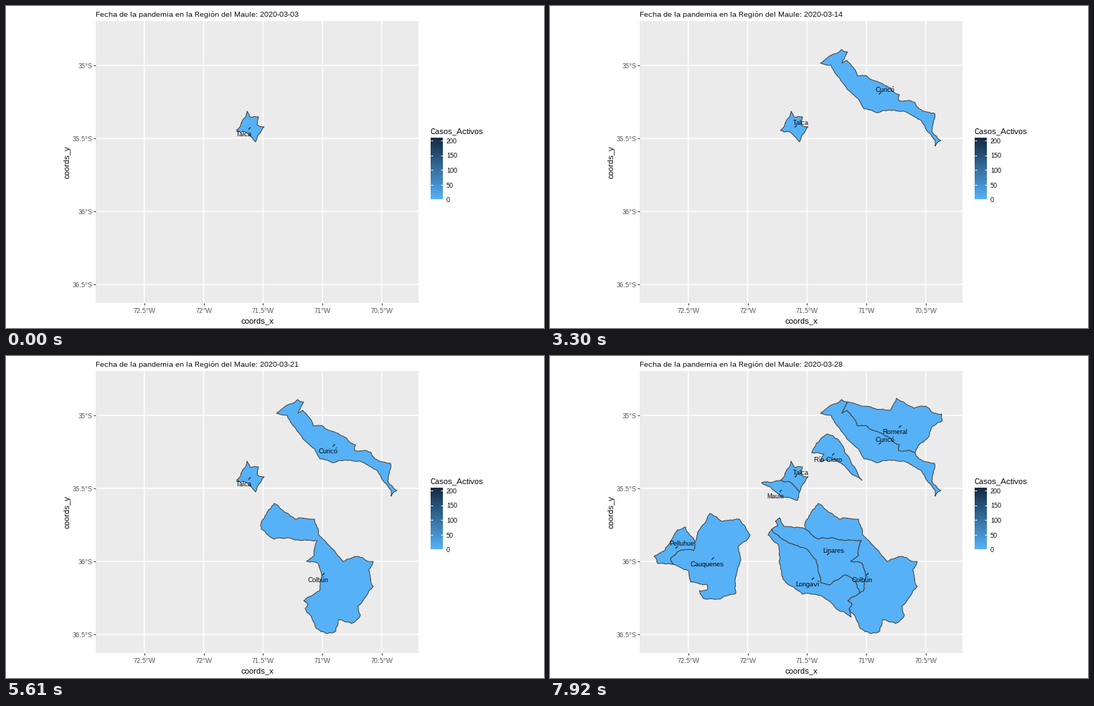
These frames come from a looping animation (750x450 px, 8 s). A matplotlib script:

```python
import numpy as np
import matplotlib.pyplot as plt
from matplotlib.animation import FuncAnimation
from matplotlib.patches import Polygon, Rectangle

W, H, DPI = 750, 450, 100
LOOP, TICK, STEP = 8000, 20, 330
LIGHT, DARK = "#56B1F7", "#132B43"

# Whole-pixel hinting gives the crisp, evenly spaced small type
plt.rcParams.update({"font.family": "Liberation Sans",
                     "text.hinting": "native", "text.hinting_factor": 1})
fig = plt.figure(figsize=(W / DPI, H / DPI), dpi=DPI, facecolor="white")
ax = fig.add_axes([0, 0, 1, 1])
ax.axis("off")


def pt(px):
    return px * 72 / DPI


def text(x, y, s, px, color="black", **kw):
    kw.setdefault("va", "baseline")
    return ax.text(x, y, s, fontsize=pt(px) + 0.01, color=color, **kw)


def line(x0, y0, x1, y1, color, px=1.0, **kw):
    return ax.plot([x0, x1], [y0, y1], color=color, lw=pt(px),
                   solid_capstyle="butt", **kw)[0]


def draw_axes():
    ax.add_patch(Rectangle((125, 21), 450, 394, fc="#EBEBEB", ec="none", zorder=0))
    for i in range(5):
        x = 192.9 + 82.75 * i
        line(x, 21, x, 415, "white", 1.5, zorder=1, snap=False)
        line(x, 415, x, 418, "#333333", zorder=1)
        text(x, 429, f"{72.5 - i / 2:g}°W", 9, "#4D4D4D", ha="center")
    for i in range(4):
        y = 83 + 102 * i
        line(125, y, 575, y, "white", 1.5, zorder=1, snap=False)
        line(122, y, 125, y, "#333333", zorder=1)
        text(120.5, y + 4, f"{35 + i / 2:g}°S", 9, "#4D4D4D", ha="right")
    text(350.5, 443, "coords_x", 11, ha="center")
    text(85.5, 218, "coords_y", 11, ha="center", va="center", rotation=90)


def draw_legend():
    text(592, 178, "Casos_Activos", 11)
    dark, light = (np.array(plt.matplotlib.colors.to_rgb(c)) for c in (DARK, LIGHT))
    mix = np.linspace(0, 1, 86)[:, None, None]
    ax.imshow(dark + (light - dark) * mix, extent=(592, 609, 270, 184),
              aspect="auto", interpolation="nearest", zorder=2)
    for i in range(5):
        y = 270.3 - 20.6 * i
        line(592, y, 595.4, y, "white", zorder=3)
        line(605.6, y, 609, y, "white", zorder=3)
        text(614, y + 4, str(50 * i), 9)


def roughen(points, rounds=3):
    """Jagged outline; the shift depends on place only, so borders coincide."""
    p = np.array(points, float)
    for _ in range(rounds):
        q = np.roll(p, -1, axis=0)
        mid = (p + q) / 2
        amp = np.minimum(0.1 * np.hypot(*(q - p).T), 1.2)
        phase = 7.3 * mid[:, 0] + 4.1 * mid[:, 1]
        mid += amp[:, None] * np.c_[np.sin(phase), np.cos(1.7 * phase)]
        p = np.stack([p, mid], axis=1).reshape(-1, 2)
    return p


# Corners of the borders that two communes share
talca_s = [(321, 174), (334, 176), (348, 190)]
curico_n = [(415, 64), (407, 80), (414, 76), (422, 85), (428, 97), (442, 98),
            (470, 112), (487, 124), (486, 132), (499, 132), (509, 135)]
linares_n = [(356, 242), (374, 256), (394, 254), (412, 258), (434, 258)]
linares_e = [(430, 278), (419, 287), (435, 290), (440, 308), (437, 328)]
linares_s = [(309, 242), (325, 257), (358, 270), (371, 285), (377, 317),
             (390, 320), (413, 306), (426, 314), (432, 331)]
longavi_e = [(432, 331), (415, 342), (421, 347), (417, 353)]
pelluhue_e = [(172, 291), (168, 283), (183, 271), (200, 272), (202, 260)]

talca = talca_s + [(354, 178), (360, 169), (350, 166), (352, 155), (340, 155),
                   (336, 147), (332, 157)]
maule = talca_s + [(345, 202), (322, 196), (311, 187), (295, 177)]
curico = curico_n + [
    (515, 144), (536, 150), (532, 175), (545, 188), (537, 196), (536, 187),
    (518, 161), (494, 147), (464, 146), (458, 149), (438, 144), (412, 112),
    (392, 83), (377, 80), (406, 61)]
romeral = curico_n[::-1] + [
    (447, 71), (474, 76), (483, 59), (507, 73), (524, 70), (535, 80),
    (546, 81), (547, 90), (532, 99), (526, 115), (513, 126)]
rio_claro = [(387, 109), (402, 117), (414, 138), (435, 174), (418, 162),
             (397, 144), (377, 148), (382, 137), (365, 135), (371, 122)]
colbun = linares_n + linares_e + longavi_e + [
    (424, 362), (432, 380), (448, 388), (460, 384), (464, 368), (482, 374),
    (494, 362), (490, 350), (512, 322), (506, 298), (512, 287), (491, 280),
    (470, 287), (436, 250), (430, 228), (403, 228), (374, 206), (364, 218),
    (355, 237)]
linares = linares_n + linares_e + linares_s[::-1] + [
    (318, 238), (314, 231), (320, 226), (326, 238)]
longavi = linares_s + longavi_e[1:] + [
    (420, 365), (403, 356), (378, 335), (352, 333), (327, 314), (320, 290),
    (317, 262), (304, 250)]
cauquenes = pelluhue_e + [
    (206, 246), (223, 220), (240, 231), (264, 228), (279, 250), (262, 267),
    (265, 288), (260, 306), (259, 332), (240, 338), (214, 339), (208, 328),
    (219, 327), (219, 319), (196, 316), (193, 300)]
pelluhue = pelluhue_e + [(189, 239), (178, 243), (160, 272), (145, 280), (150, 290)]


class Commune:
    """Outline with a label below left of its centre, or above right on some days."""

    def __init__(self, name, shape, centre, first, raised=()):
        self.centre, self.first, self.raised = centre, first, raised
        self.area = ax.add_patch(Polygon(
            roughen(shape), fc=LIGHT, ec="#404040", lw=pt(1), zorder=4))
        self.link = line(0, 0, 0, 0, "black", zorder=5)
        self.label = text(0, 0, name, 9, ha="center", zorder=6)

    def show(self, day):
        for artist in (self.area, self.link, self.label):
            artist.set_visible(day >= self.first)
        x, y = self.centre
        side = 1 if day in self.raised else -1
        self.label.set_position((x + 9 * side, y + 4.3 - 8 * side))
        self.link.set_data([x, x + 3 * side], [y, y - 3 * side])


draw_axes()
draw_legend()
ax.set_xlim(0, W)
ax.set_ylim(H, 0)
title = text(125, 15, "", 10)

north_days = {6, 8, 10, 13, 15, 16, 18, 21, 24}
communes = [
    Commune("Talca", talca, (341, 169.5), 0, north_days),
    Commune("Curicó", curico, (458.5, 123.5), 8, north_days),
    Commune("Colbún", colbun, (444, 303.5), 14, {20, 22, 23}),
    Commune("Linares", linares, (386.3, 278.3), 18, {20, 22, 23, 24}),
    Commune("Río Claro", rio_claro, (396.3, 136), 18, range(18, 24)),
    Commune("Longaví", longavi, (368, 309.7), 19, {20}),
    Commune("Maule", maule, (323, 187), 23),
    Commune("Romeral", romeral, (489.5, 97), 24),
    Commune("Cauquenes", cauquenes, (228.5, 281.5), 24),
    Commune("Pelluhue", pelluhue, (175, 269), 24, {24}),
]


def update(frame):
    day = min((frame * TICK + TICK // 2) // STEP, 24)
    date = 3 + day + (day >= 9)  # one date is missing from the data
    title.set_text(f"Fecha de la pandemia en la Región del Maule: 2020-03-{date:02d}")
    for c in communes:
        c.show(day)
    return []


anim = FuncAnimation(fig, update, frames=LOOP // TICK, interval=TICK,
                     repeat=True, repeat_delay=0, blit=False)
plt.show()
```
